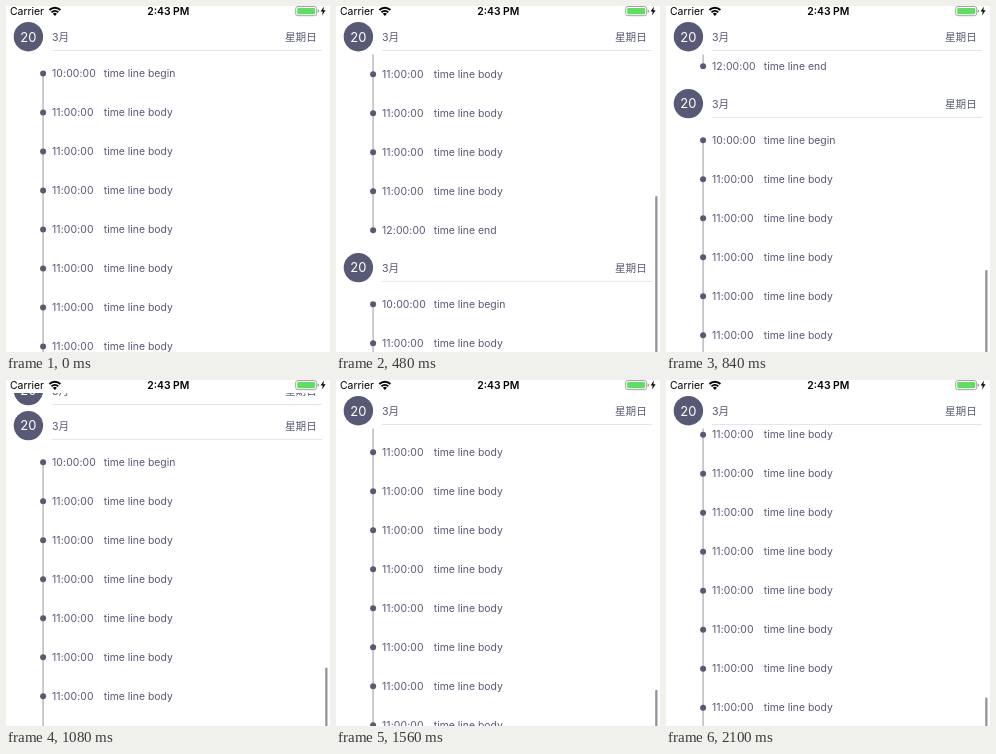
An HTML page that plays this animation: 324x346 px, repeating every 2.16 s.

```html
<!DOCTYPE html>
<html lang="zh">
<head>
<meta charset="utf-8">
<title>Timeline list</title>
<style>
  html, body { margin: 0; width: 100%; height: 100%; overflow: hidden; background: #fff; }
  svg { display: block; width: 324px; height: 346px; }
  text { font-family: Inter, "Noto Sans CJK SC", "Noto Sans CJK", sans-serif; font-size: 10.4px; }
  .ink { fill: #575975; }
  .time { letter-spacing: 0.12px; }
  .day { font-size: 13px; }
  .date { font-size: 10.6px; }
</style>
</head>
<body>
<svg id="stage" viewBox="0 0 324 346">
  <defs><clipPath id="table"><rect y="13" width="324" height="333"/></clipPath></defs>
  <rect width="324" height="346" fill="#fff"/>
  <g clip-path="url(#table)">
    <g id="rows"></g>
    <g id="headers"></g>
    <rect id="bar" x="319.2" width="2.3" height="252" rx="1.1" fill="#949499"/>
  </g>
  <g id="status">
    <text x="4" y="8.7">Carrier</text>
    <g fill="none" stroke="#000" stroke-width="1.8">
      <path d="M43.4 4A7.8 7.8 0 0 1 54.4 4"/>
      <path d="M45.5 6.3A4.8 4.8 0 0 1 52.3 6.3"/>
    </g>
    <path d="M48.9 9.9L46.9 7.7A2.8 2.8 0 0 1 50.9 7.7Z"/>
    <text x="162.3" y="8.7" text-anchor="middle" font-weight="600">2:43 PM</text>
    <rect x="289.7" y="0.5" width="21" height="9.2" rx="2.3" fill="none" stroke="#999" stroke-width="0.9"/>
    <rect x="291.2" y="2" width="18" height="6.2" rx="1.1" fill="#62dc62"/>
    <path d="M311.7 3.6A1.5 1.5 0 0 1 311.7 6.6Z" fill="#999"/>
    <path d="M318 0.6L314.6 5.5H316.8L316 9.4L319.6 4.2H317.3Z"/>
  </g>
</svg>
<script>
const LOOP = 2160, STEP = 60, START = 120;
const ROW = 39, HEADER = 35, COUNT = 15, SECTIONS = 2;
const SECTION = HEADER + ROW * COUNT;
const PIN = 31, FIRST_ROW = 36.4;
const LIMIT = 679.2;

// [time, distance left to the end of the list]
const GLIDE = [[120, 662], [480, 290.1], [840, 126.1], [1080, 74.1], [1560, 25.1], [1860, 13.1], [2100, 7.6]];

const byId = id => document.getElementById(id);

function add(parent, tag, attrs, text) {
  const node = document.createElementNS("http://www.w3.org/2000/svg", tag);
  for (const key in attrs) node.setAttribute(key, attrs[key]);
  if (text) node.textContent = text;
  parent.appendChild(node);
  return node;
}

function buildRows(section) {
  const top = PIN + section * SECTION + FIRST_ROW;
  const rows = byId("rows");
  add(rows, "line", { x1: 37.1, x2: 37.1, y1: top, y2: top + ROW * (COUNT - 1), stroke: "#b6b6bb", "stroke-width": 1.4 });
  for (let i = 0; i < COUNT; i++) {
    const y = top + i * ROW;
    const [time, word] = i === 0 ? ["10:00:00", "begin"] : i === COUNT - 1 ? ["12:00:00", "end"] : ["11:00:00", "body"];
    add(rows, "circle", { cx: 37.1, cy: y, r: 3, class: "ink" });
    add(rows, "text", { x: 46, y: y + 3.7, class: "ink time" }, time);
    add(rows, "text", { x: 97.8, y: y + 3.7, class: "ink" }, "time line " + word);
  }
}

function buildHeader() {
  const header = add(byId("headers"), "g", {});
  add(header, "rect", { y: -HEADER / 2 - 1, width: 324, height: HEADER + 1, fill: "#fff" });
  add(header, "circle", { cx: 22.4, cy: -0.3, r: 14.7, class: "ink" });
  add(header, "text", { x: 22.4, y: 4.5, "text-anchor": "middle", fill: "#fff", class: "day" }, "20");
  add(header, "text", { x: 46, y: 3.9, class: "ink date" }, "3月");
  add(header, "text", { x: 310.8, y: 3.9, "text-anchor": "end", class: "ink date" }, "星期日");
  add(header, "rect", { x: 46, y: 13, width: 270, height: 0.9, fill: "#e2e2ea" });
  return header;
}

const headers = [];
for (let s = 0; s < SECTIONS; s++) {
  buildRows(s);
  headers.push(buildHeader());
}

function scrollAt(time) {
  if (time < START) return 0;
  const next = Math.max(1, GLIDE.findIndex(([t]) => t >= time));
  const [t0, left0] = GLIDE[next - 1], [t1, left1] = GLIDE[next];
  return LIMIT - left0 * Math.pow(left1 / left0, (time - t0) / (t1 - t0));
}

function render(ms) {
  const time = Math.floor((ms % LOOP) / STEP) * STEP;
  const scroll = scrollAt(time);
  byId("rows").setAttribute("transform", `translate(0 ${-scroll})`);
  headers.forEach((header, s) => {
    const natural = PIN + s * SECTION - scroll;
    const pushed = natural + SECTION - HEADER;
    header.setAttribute("transform", `translate(0 ${Math.min(Math.max(natural, PIN), pushed)})`);
  });
  const bar = byId("bar");
  bar.setAttribute("y", 14.3 + scroll * 0.4515);
  bar.setAttribute("visibility", time < START ? "hidden" : "visible");
}

const begin = performance.now();
function tick() {
  render(performance.now() - begin);
  requestAnimationFrame(tick);
}
tick();
</script>
</body>
</html>
```
